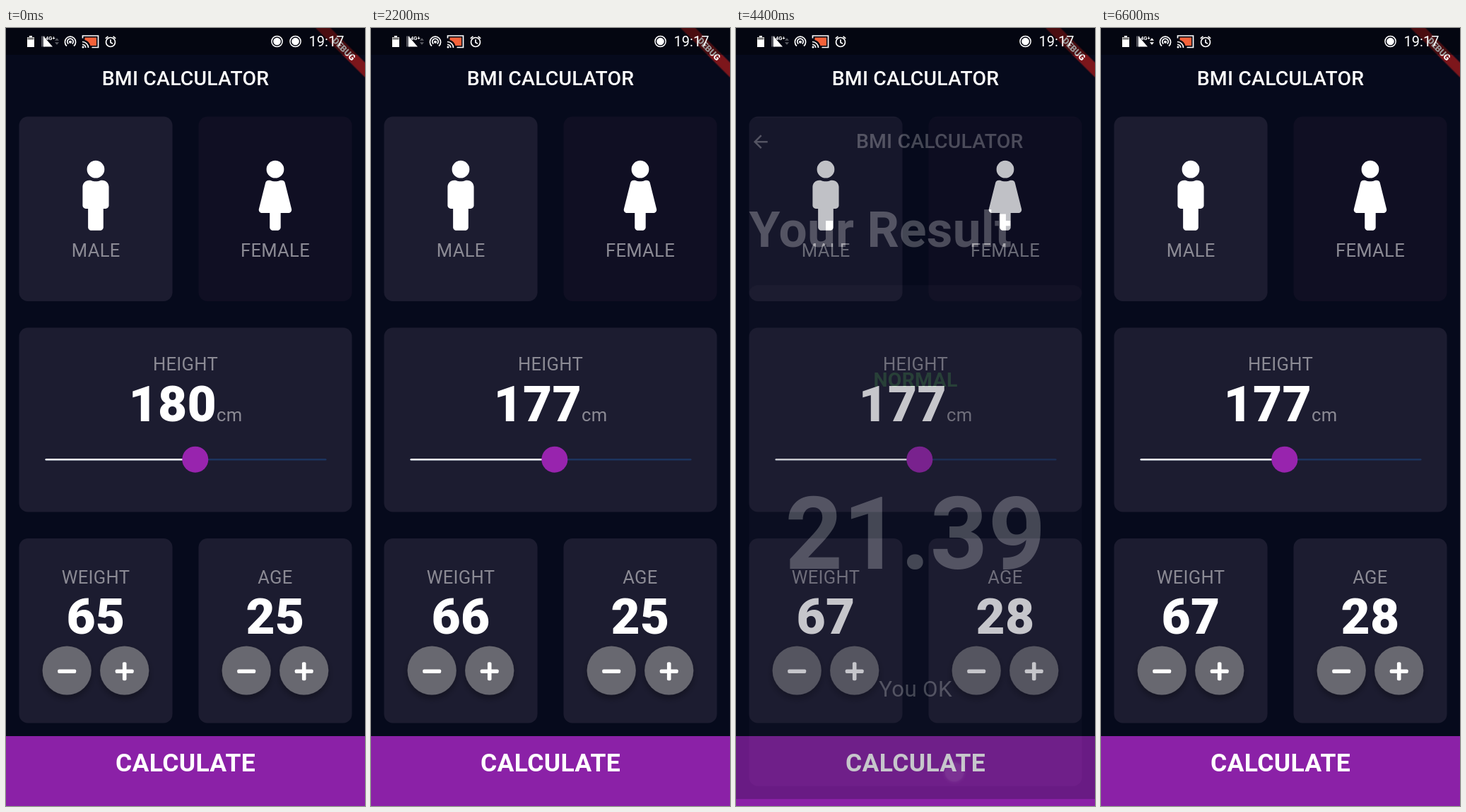
These frames come from a looping animation (508 px wide and 1102 px high, 6.7 s). An HTML page:

```html
<!DOCTYPE html>
<html lang="en">
<head>
<meta charset="utf-8">
<title>BMI Calculator</title>
<style>
  html, body { margin: 0; width: 100%; height: 100%; overflow: hidden; background: #060a1c; }
  svg { display: block; width: 100vw; height: 100vh; }
  text { font-family: Roboto, "Noto Sans", sans-serif; fill: #fff; text-anchor: middle; letter-spacing: .31px; }
  .label { font-size: 25.58px; fill: #8b8a94; }
  .value { font-size: 71.07px; font-weight: 900; }
  .title { font-size: 28.4px; font-weight: 500; letter-spacing: .19px; }
  .action { font-size: 35.5px; font-weight: 700; }
  .card { fill: #1c1c30; }
  .bar { fill: #8b21a7; }
  .line { fill: none; stroke: #fff; }
</style>
</head>
<body>
<svg viewBox="0 0 508 1102" preserveAspectRatio="none">
  <defs>
    <radialGradient id="glow">
      <stop offset="0" stop-color="#fff" stop-opacity=".62"/>
      <stop offset=".55" stop-color="#fff" stop-opacity=".64"/>
      <stop offset=".7" stop-color="#fff" stop-opacity=".58"/>
      <stop offset=".8" stop-color="#fff" stop-opacity=".2"/>
      <stop offset="1" stop-color="#fff" stop-opacity="0"/>
    </radialGradient>
    <filter id="lift" x="-30%" y="-30%" width="160%" height="170%">
      <feDropShadow dx="0" dy="5" stdDeviation="5" flood-color="#000" flood-opacity=".32"/>
    </filter>
    <filter id="soft" x="-20%" y="-80%" width="140%" height="260%">
      <feDropShadow dx="0" dy="0" stdDeviation="3" flood-color="#000" flood-opacity=".4"/>
    </filter>
  </defs>

  <rect width="508" height="1102" fill="#060a1c"/>

  <g id="home">
    <text class="title" x="254" y="81.3">BMI CALCULATOR</text>

    <rect class="card" x="18.5" y="125.5" width="217" height="261.5" rx="12.4"/>
    <rect x="272.5" y="125.5" width="217" height="261.5" rx="12.4" fill="#100f23"/>
    <path fill="#fff" transform="translate(108.4 187.8) scale(.1934)" d="M96 0a64 64 0 0 1 0 128a64 64 0 0 1 0-128m48 144h-11.4c-22.7 10.4-49.6 10.9-73.2 0H48c-26.5 0-48 21.5-48 48v136c0 13.3 10.7 24 24 24h16v136c0 13.3 10.7 24 24 24h64c13.3 0 24-10.7 24-24V352h16c13.3 0 24-10.7 24-24V192c0-26.5-21.5-48-48-48z"/>
    <path fill="#fff" transform="translate(356.2 187.8) scale(.1934)" d="M128 0a64 64 0 0 1 0 128a64 64 0 0 1 0-128m119.3 354.2l-48-192A24 24 0 0 0 176 144h-11.4c-22.7 10.4-49.6 10.9-73.2 0H80a24 24 0 0 0-23.3 18.2l-48 192C4.900 369.300 16.400 384 32 384h56v104c0 13.300 10.700 24 24 24h32c13.300 0 24-10.700 24-24V384h56c15.600 0 27.100-14.700 23.300-29.800z"/>
    <text class="label" x="127.200" y="323.700">MALE</text>
    <text class="label" x="381" y="323.700">FEMALE</text>

    <rect class="card" x="18.5" y="424.500" width="471" height="261" rx="12.400"/>
    <text class="label" x="254" y="485.200">HEIGHT</text>
    <text x="254" y="557.200"><tspan class="value" id="height">180</tspan><tspan class="label">cm</tspan></text>
    <rect x="55.500" y="609.900" width="398" height="2.500" rx="1.250" fill="#1c345f"/>
    <rect id="fill" x="55.500" y="609.900" height="2.500" rx="1.250" fill="#fff"/>
    <circle id="halo" cy="611.200" fill="#9c27b0" fill-opacity=".2"/>
    <circle id="thumb" cy="611.200" r="18.500" fill="#9824ae"/>

    <rect class="card" x="18.500" y="723" width="217" height="261.500" rx="12.400"/>
    <rect class="card" x="272.500" y="723" width="217" height="261.500" rx="12.400"/>
    <text class="label" x="127" y="786.500">WEIGHT</text>
    <text class="label" x="381" y="786.500">AGE</text>
    <text class="value" id="weight" x="127" y="858.200">65</text>
    <text class="value" id="age" x="381" y="858.200">25</text>
    <g id="buttons"></g>

    <rect class="bar" y="1003" width="508" height="99"/>
    <text class="action" x="254" y="1053">CALCULATE</text>
  </g>

  <g id="result">
    <rect y="38" width="508" height="1064" fill="#060a1c"/>
    <path fill="#fff" transform="translate(20 57.200) scale(1.236)" d="M20 11H7.830l5.590-5.590L12 4l-8 8 8 8 1.410-1.410L7.830 13H20z"/>
    <text class="title" x="288.200" y="81.300">BMI CALCULATOR</text>
    <text x="18.500" y="221" style="font-size:71.07px;font-weight:700;text-anchor:start">Your Result</text>
    <rect class="card" x="18.500" y="275" width="471" height="709.500" rx="12.400"/>
    <text x="254" y="418.700" style="font-size:28.4px;font-weight:700;fill:#4caf50">NORMAL</text>
    <text x="254" y="677" style="font-size:142.1px;font-weight:700">21.39</text>
    <text x="254" y="857.700" style="font-size:31.3px">You OK</text>
    <rect class="bar" y="1003" width="508" height="99"/>
    <text class="action" x="254" y="1053">RE-CALCULATE</text>
  </g>

  <g transform="translate(508 0) rotate(45)">
    <rect x="-49.400" y="34.600" width="98.800" height="14.800" fill="#b71c1c" fill-opacity=".63" filter="url(#soft)"/>
    <text y="46.500" style="font-size:12.6px;font-weight:900;letter-spacing:0">DEBUG</text>
  </g>

  <g id="status">
    <rect width="508" height="38" fill="#000" fill-opacity=".4"/>
    <path fill="#fff" d="M33 11h4v2h3v14h-10v-14h3z"/>
    <path fill="#777" d="M30.500 13.500h9v3h-9z"/>
    <path fill="#55565e" d="M50 11.500h5v15h-5z"/>
    <path fill="#fff" d="M53 11.500L66 26.500H53z"/>
    <text x="62.800" y="16.800" style="font-size:7.5px;font-weight:700;letter-spacing:0">4G+</text>
    <path id="traffic" fill="#fff" d="M69 17.800l3-3.600 3 3.600zM69 20.200l3 3.600 3-3.600z"/>
    <g class="line" stroke-width="1.700">
      <path d="M86 25.500a7.600 7.600 0 1 1 10 0M88.300 22.500a4.200 4.200 0 1 1 5.400 0"/>
      <path d="M108.500 14.500v-3.500h22v16.500h-9"/>
      <path d="M108 19.500a8.500 8.500 0 0 1 8.500 8.500M108 23.300a4.700 4.700 0 0 1 4.700 4.700"/>
      <circle cx="148" cy="20" r="6.500"/>
      <path d="M148 16.200v4.200l3 1.800M140.800 14.800l3.600-3M155.200 14.800l-3.600-3"/>
    </g>
    <circle cx="91" cy="19.700" r="2" fill="#fff"/>
    <circle cx="109" cy="27" r="1.500" fill="#fff"/>
    <path fill="#f4623a" d="M111.500 13.500h16.500v11.500h-8.500q-2-6.500-8-8z"/>
    <g id="spare"><circle class="line" cx="383.500" cy="19" r="7.600" stroke-width="1.500"/><circle cx="383.500" cy="19" r="5.300" fill="#fff"/></g>
    <circle class="line" cx="409.500" cy="19" r="7.600" stroke-width="1.500"/>
    <circle cx="409.500" cy="19" r="5.300" fill="#fff"/>
    <text x="453.500" y="26.200" style="font-size:20px;letter-spacing:0">19:17</text>
  </g>

  <circle id="touch" r="18" fill="url(#glow)"/>
</svg>
<script>
const LOOP = 6700, STEP = 100;
const $ = id => document.getElementById(id);
const set = (id, attrs) => { for (const k in attrs) $(id).setAttribute(k, attrs[k]); };
const clamp = v => Math.min(1, Math.max(0, v));
const ramp = (t, from, to) => clamp((t - from) / (to - from));

// Cubic bezier easing, solved by bisection
function bezier(x1, y1, x2, y2) {
  const at = (a, b, s) => 3 * (1 - s) ** 2 * s * a + 3 * (1 - s) * s * s * b + s ** 3;
  return x => {
    if (x <= 0 || x >= 1) return clamp(x);
    let lo = 0, hi = 1;
    for (let i = 0; i < 24; i++) {
      const mid = (lo + hi) / 2;
      if (at(x1, x2, mid) < x) lo = mid; else hi = mid;
    }
    return at(y1, y2, lo);
  };
}
const easeIn = bezier(.42, 0, 1, 1);
const fastOutSlowIn = bezier(.4, 0, .2, 1);
const easeInOut = bezier(.42, 0, .58, 1);

const buttons = [[86.2, false], [167.7, true], [340.2, false], [421.7, true]];
$('buttons').innerHTML = buttons.map(([x, plus], i) => `
  <circle id="btn${i}" cx="${x}" cy="910" r="34.6" fill="#67676f" filter="url(#lift)"/>
  <g fill="#fff"><rect x="${x - 13}" y="908.4" width="26" height="5.6" rx="1.9"/>
  ${plus ? `<rect x="${x - 2.8}" y="898.2" width="5.6" height="26" rx="1.9"/>` : ''}</g>`).join('');

const drag = { down: 250, up: 1400 };
const push = 4270, pop = 6166, pageTime = 300;
const tap = (x, y, down, up, button) => ({ x, y, down, up, button });
const taps = [
  tap(169, 917, 1800, 1900, 1),
  tap(169, 917, 2300, 2400, 1),
  tap(425, 916, 2850, 2950, 3),
  tap(425, 916, 3150, 3250, 3),
  tap(425, 916, 3550, 3650, 3),
  tap(309, 1054, 4100, push),
  tap(262, 1067, 6000, pop)
];
const busy = [[400, 1800], [3700, 4100], [5900, LOOP]];
const within = (t, [from, to]) => t >= from && t < to;
const presses = (t, button) => taps.filter(p => p.button === button && p.up <= t).length;

function drawSlider(t) {
  const value = 180 - 3 * easeInOut(ramp(t, 450, 1100));
  const x = 55.5 + 398 * (value - 100) / 150;
  $('height').textContent = Math.round(value);
  set('fill', { width: x - 55.5 });
  set('thumb', { cx: x });
  set('halo', { cx: x, r: 37 * ramp(t, drag.down, drag.down + 100) * (1 - ramp(t, drag.up, drag.up + 100)) });
  return x;
}

function drawTouch(t, sliderX) {
  const slide = { x: sliderX, y: 642 + 12 * easeInOut(ramp(t, 350, 1050)), ...drag };
  const live = [slide, ...taps].filter(p => t >= p.down).pop();
  const alpha = live ? 1 - ramp(t, live.up, live.up + 150) : 0;
  set('touch', { cx: live ? live.x : 0, cy: live ? live.y : 0, opacity: alpha });
}

function drawButtons(t) {
  buttons.forEach((_, i) => {
    const lit = taps.some(p => p.button === i && within(t, [p.down, p.up + 100]));
    set('btn' + i, { fill: lit ? '#7b7a82' : '#67676f' });
  });
  $('weight').textContent = 65 + presses(t, 1);
  $('age').textContent = 25 + presses(t, 3);
}

function drawResult(t) {
  const v = t < pop ? ramp(t, push, push + pageTime) : 1 - ramp(t, pop, pop + pageTime);
  const dy = (1 - fastOutSlowIn(v)) * 275.5;
  set('result', { opacity: easeIn(v), transform: `translate(0 ${dy})`, visibility: v > 0 ? 'visible' : 'hidden' });
}

function render(t) {
  const x = drawSlider(t);
  drawButtons(t);
  drawResult(t);
  drawTouch(t, x);
  set('traffic', { opacity: busy.some(span => within(t, span)) ? 1 : .35 });
  set('spare', { visibility: t < 2000 ? 'visible' : 'hidden' });
}

const start = performance.now();
function tick() {
  const t = (performance.now() - start) % LOOP;
  render(Math.floor(t / STEP) * STEP);
  requestAnimationFrame(tick);
}
tick();
</script>
</body>
</html>
```
